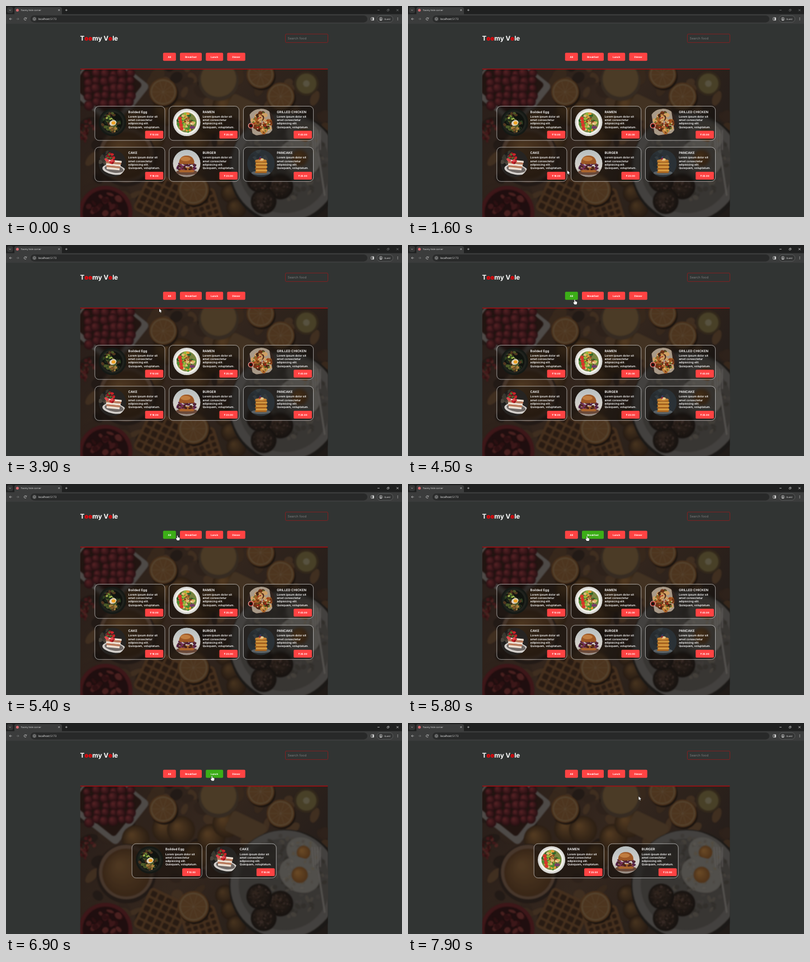
Animation, 708 px wide and 378 px high, one loop 8 s. Source, as an HTML page with a canvas:

```html
<!DOCTYPE html>
<html lang="en">
<head>
<meta charset="utf-8">
<title>Toomy Vole corner</title>
<style>
html, body { margin: 0; width: 100%; height: 100%; overflow: hidden; background: #313433; }
canvas { display: block; width: 708px; height: 378px; }
</style>
</head>
<body>
<canvas id="stage"></canvas>
<script>
const W = 708, H = 378, LOOP = 8000, TAU = Math.PI * 2;
const DPR = window.devicePixelRatio || 1;
const UI = 'Inter, Roboto, sans-serif', CHROME = '"Open Sans", "Noto Sans", sans-serif';
const PAGE = '#313433', RED = '#ff4343', GREEN = '#3cae17', ICON = '#dedede';
const LEFT = 132.8, TOP = 113, WIDE = 442.6;
const CARD = { w: 125.2, h: 61.3, dx: 132.8, dy: 73.5, dish: 24.6 };
let g;

function setup(cv) {
  cv.width = Math.round(W * DPR);
  cv.height = Math.round(H * DPR);
  const c = cv.getContext('2d');
  c.scale(DPR, DPR);
  if ('textRendering' in c) c.textRendering = 'geometricPrecision';
  return c;
}

function layer(draw) {
  const cv = document.createElement('canvas'), old = g;
  g = setup(cv);
  draw();
  g = old;
  return cv;
}

let seed = 1;
const rnd = () => (seed = seed * 16807 % 2147483647) / 2147483647;
const repeat = (n, fn) => { for (let i = 0; i < n; i++) fn(i); };

function disc(x, y, r, fill, ry = r, rot = 0) {
  g.fillStyle = fill;
  g.beginPath();
  g.ellipse(x, y, r, ry, rot, 0, TAU);
  g.fill();
}

function ring(x, y, r, color, w = 0.6, from = 0, to = TAU) {
  g.strokeStyle = color;
  g.lineWidth = w;
  g.beginPath();
  g.arc(x, y, r, from, to);
  g.stroke();
}

function box(x, y, w, h, r, fill, stroke, lw = 0.7) {
  g.beginPath();
  g.roundRect(x, y, w, h, r);
  if (fill) { g.fillStyle = fill; g.fill(); }
  if (stroke) { g.strokeStyle = stroke; g.lineWidth = lw; g.stroke(); }
}

function tilted(x, y, rot, draw) {
  g.save();
  g.translate(x, y);
  g.rotate(rot);
  draw();
  g.restore();
}

function line(x, y, x2, y2, color = ICON, w = 0.65) {
  g.strokeStyle = color;
  g.lineWidth = w;
  g.beginPath();
  g.moveTo(x, y);
  g.lineTo(x2, y2);
  g.stroke();
}

function cross(x, y, r, color, rot = Math.PI / 4) {
  tilted(x, y, rot, () => { line(-r, 0, r, 0, color); line(0, -r, 0, r, color); });
}

function chevron(x, y, r, rot, color) {
  tilted(x, y, rot, () => { line(-r, -r, 0, 0, color); line(0, 0, r, -r, color); });
}

function text(s, x, y, size, color = '#fff', weight = 400, font = UI, align = 'left') {
  g.font = `${weight} ${size}px ${font}`;
  g.fillStyle = color;
  g.textAlign = align;
  g.fillText(s, x, y);
  return g.measureText(s).width;
}

// seeded blobs spread over a circle
function scatter(n, x, y, r, size, colors) {
  repeat(n, i => {
    const a = rnd() * TAU, d = Math.sqrt(rnd()) * r;
    disc(x + d * Math.cos(a), y + d * Math.sin(a), size * (0.6 + rnd() * 0.7),
      colors[i % colors.length], size * (0.4 + rnd() * 0.5), rnd() * 3);
  });
}

function ball(x, y, r, light, dark) {
  const gr = g.createRadialGradient(x - r * 0.3, y - r * 0.3, r * 0.1, x, y, r);
  gr.addColorStop(0, light);
  gr.addColorStop(1, dark);
  disc(x, y, r, gr);
}

function slice(x, y, r) {
  disc(x + 2, y + 3, r, '#1b120c');
  disc(x, y, r, '#56371c');
  disc(x, y, r * 0.9, '#655036');
  disc(x, y, r * 0.8, '#5a3c20');
  repeat(5, i => tilted(x, y, i * Math.PI / 5, () => line(-r * 0.8, 0, r * 0.8, 0, '#685139', 0.8)));
}

function waffle(x, y, size, rot) {
  tilted(x, y, rot, () => {
    box(-size / 2, -size / 2, size, size, 8, '#50351f');
    const step = (size - 6) / 5;
    repeat(25, i => box(-size / 2 + 5 + i % 5 * step, -size / 2 + 5 + Math.floor(i / 5) * step,
      step - 4, step - 4, 2, '#2c1c11'));
  });
}

function fryEgg(x, y, r) {
  disc(x, y, r, '#5f5c57', r * 0.8, 0.5);
  scatter(30, x, y, r * 0.8, 3, ['#67635c', '#57524b', '#625a4b']);
  ball(x, y, r * 0.38, '#7d5528', '#5b3819');
}

const photo = layer(() => {
  g.beginPath();
  g.rect(LEFT, TOP, WIDE, H - TOP);
  g.clip();
  const wood = g.createLinearGradient(LEFT, TOP, LEFT + WIDE, H);
  wood.addColorStop(0, '#2c1f19');
  wood.addColorStop(0.45, '#3b2a1f');
  wood.addColorStop(1, '#211b18');
  g.fillStyle = wood;
  g.fillRect(LEFT, TOP, WIDE, H);
  g.filter = `blur(${0.9 * DPR}px)`;
  seed = 11;
  scatter(150, 350, 240, 230, 13, ['#4a3422', '#33241b', '#241a15', '#3f2c1d']);

  tilted(184, 146, -0.9, () => box(-50, -58, 98, 114, 8, '#5b5653'));
  tilted(182, 142, -0.9, () => box(-42, -50, 82, 98, 6, '#24140f'));
  repeat(30, i => ball(144 + i % 6 * 15 + rnd() * 5, 119 + Math.floor(i / 6) * 13 + rnd() * 4 + (i % 6 ? 0 : 3),
    7 + rnd() * 3, '#622226', '#2a0d10'));
  scatter(30, 138, 220, 20, 4, ['#4b181a', '#35100f', '#5a2623']);

  repeat(7, i => ball(232 + i * 27, 208 + 30 * Math.sin(i * 1.9), 25, '#5f4122', '#302012'));
  disc(380, 134, 36, '#3d3024');
  disc(380, 131, 32, '#574329');
  tilted(428, 190, 0.45, () => box(-34, -22, 68, 40, 6, '#4c3824'));
  for (const [x, y] of [[281, 154], [491, 162], [455, 123]]) slice(x, y, 25);
  disc(537, 139, 22, '#392c1c');
  disc(537, 139, 18, '#544a2b');
  disc(537, 139, 6, '#67604a');

  disc(215, 270, 53, '#241a15');
  disc(215, 267, 49, '#543f31');
  ball(215, 268, 43, '#5b3f23', '#402916');
  disc(178, 370, 48, '#471619');
  disc(178, 370, 41, '#210b0c');
  scatter(40, 178, 370, 36, 6, ['#451719', '#310e10', '#552221']);

  waffle(278, 345, 78, 0.45);
  waffle(350, 364, 64, -0.3);
  slice(335, 329, 28);
  repeat(3, i => ball(392 + i * 10, 308 + i * 27, 18, '#50381f', '#291b11'));

  disc(500, 292, 101, '#1c1916');
  disc(498, 289, 97, '#4e4b48');
  disc(498, 289, 82, '#403d3a');
  scatter(120, 500, 275, 74, 5, ['#46423e', '#383530', '#4d4841']);
  fryEgg(532, 232, 32);
  fryEgg(525, 272, 38);
  repeat(3, i => {
    const a = -0.2 + i * TAU / 3, x = 468 + 23 * Math.cos(a), y = 328 + 23 * Math.sin(a);
    ball(x, y, 23, '#37281f', '#15100d');
    scatter(50, x, y, 18, 2.2, ['#40302a', '#1f1712', '#2f231d']);
  });
  repeat(4, i => line(547 + i * 5, 222, 550 + i * 4, 258, '#6f6c69', 1.7));
  line(557, 256, 570, 340, '#65625e', 3);
  g.filter = 'none';
  g.fillStyle = 'rgba(28,28,27,.2)';
  g.fillRect(LEFT, TOP, WIDE, H);
});

// each dish is drawn around 0,0 and clipped to a circle
const plate = (...colors) => colors.forEach((c, i) => disc(0, 0, 25 - i * 3.5, c));

const dishes = {
  egg() {
    plate('#151915', '#20231e', '#10130f');
    scatter(60, -2, 0, 17, 3, ['#2e4120', '#4d5a28', '#513720', '#192419']);
    scatter(14, 2, 10, 7, 2.4, ['#a9803e', '#7c5727']);
    disc(1, 1, 6.5, '#ddd2bd', 5, -0.4);
    disc(2, 1, 3.5, '#f0a325', 3);
    scatter(7, -6, -8, 5, 2, ['#6b9132', '#a3b952']);
  },
  ramen() {
    plate('#d8d8d5', '#f2f0e9', '#798441');
    scatter(60, 0, 0, 16, 3.3, ['#4b8d31', '#96b93b', '#e49b36', '#dfbf78', '#2e6628']);
    repeat(4, i => disc(-12 + i, -7 + i * 6, 3.2, '#d8362a'));
    scatter(40, 4, -2, 8, 1.8, ['#a85e27', '#f0d29b', '#6d391d', '#dfab61']);
    disc(10, 9, 5, '#743c66', 3);
  },
  chicken() {
    plate('#30241f');
    tilted(-1, 0, -0.15, () => box(-17, -24, 36, 46, 3, '#a99a88'));
    scatter(45, 2, 0, 17, 5, ['#a65d24', '#713417', '#c78a40', '#4c2615', '#d0a064']);
    scatter(30, 2, 0, 18, 1.8, ['#60742c', '#e8c78d', '#a6261a']);
    disc(-18, 6, 5, '#ece0d4');
    disc(-18, 6, 4, '#1c1210');
    ring(-18, 6, 3.6, '#c62620', 1.2);
  },
  cake() {
    plate('#262422');
    scatter(25, -12, -8, 14, 5, ['#39382f', '#1d1d1b', '#4a443b']);
    disc(3, 11, 21, '#d4d0cc', 9, 0.15);
    disc(3, 10, 17, '#6f6966', 6.5, 0.15);
    tilted(1, 3, 0.1, () => repeat(5, i =>
      box(-14 + i * 0.8, -9 + i * 3.4, 29 - i * 1.4, 3.6, 1, i % 2 ? '#b9795a' : '#eee0d2')));
    scatter(16, -3, -9, 9, 3, ['#c9232a', '#91151e', '#e0474b']);
    scatter(6, -5, -13, 6, 1.7, ['#4d7b34']);
  },
  burger() {
    const wall = g.createLinearGradient(0, -25, 0, 25);
    wall.addColorStop(0, '#b6bec0');
    wall.addColorStop(0.65, '#d6d2cc');
    wall.addColorStop(1, '#8f8178');
    plate(wall);
    disc(0, 16, 19, '#69493a', 5);
    box(-14, 7, 28, 9, 4, '#a9642d');
    repeat(50, i => disc(-16 + rnd() * 32, rnd() * 11, 2.5, ['#512044', '#472018', '#76305a', '#4f2a20'][i % 4], 1.5));
    box(-13.5, -14, 27, 15, [13, 13, 3, 3], '#9d5826');
    disc(-2, -8, 9, '#c07d40', 4);
  },
  pancake() {
    plate('#2a3136');
    scatter(20, -6, -8, 16, 6, ['#343b3e', '#262c30']);
    disc(0, 17, 17, '#596166', 4);
    repeat(7, i => box(-10.5 + i % 2, 14 - i * 3.1, 21, 3.3, 1.7, i % 2 ? '#d79a3f' : '#a8641f'));
    disc(0, -5, 10.5, '#c98534', 2.6);
    disc(1, -7, 4, '#e8c487', 2.3);
    scatter(5, 0, -9, 3, 2, ['#303b61', '#8e2530']);
  }
};

const foods = [
  ['Boilded Egg', 10, 'egg'], ['RAMEN', 25, 'ramen'], ['GRILLED CHICKEN', 45, 'chicken'],
  ['CAKE', 18, 'cake'], ['BURGER', 23, 'burger'], ['PANCAKE', 25, 'pancake']
];
const blurb = ['Lorem ipsum dolor sit', 'amet consectetur', 'adipisicing elit.', 'Quisquam, voluptatum.'];

function card([name, price, dish], x, y) {
  g.save();
  box(x, y, CARD.w, CARD.h, 7.4);
  g.clip();
  g.filter = `blur(${2.5 * DPR}px)`;
  g.drawImage(photo, 0, 0, W, H);
  g.filter = 'none';
  g.fillStyle = 'rgba(14,10,8,.42)';
  g.fillRect(x, y, CARD.w, CARD.h);
  g.restore();
  box(x, y, CARD.w, CARD.h, 7.4, null, 'rgba(255,255,255,.8)');

  tilted(x + 31.4, y + 29, 0, () => {
    g.beginPath();
    g.arc(0, 0, CARD.dish, 0, TAU);
    g.clip();
    seed = 29;
    dishes[dish]();
  });

  text(name, x + 59.8, y + 12, 5.9, '#fff', 600);
  blurb.forEach((s, i) => text(s, x + 59.8, y + 20.4 + i * 6.26, 5.06, '#fff', 600));
  box(x + 89.9, y + 43.9, 32.6, 14.2, 1.85, RED);
  text(`₹ ${price}.00`, x + 106.2, y + 52.6, 4.3, '#fff', 700, UI, 'center');
}

function browser() {
  g.fillStyle = '#1f2020';
  g.fillRect(0, 0, W, 15);
  g.fillStyle = '#3b3c3c';
  g.fillRect(0, 14.6, W, 17.2);
  box(2, 2, 10.6, 10.6, 3.4, '#353636');
  chevron(7.3, 8.2, 1.5, 0, ICON);
  box(15, 2, 85, 16, [3.6, 3.6, 0, 0], '#3b3c3c');
  disc(20.4, 7.4, 2.5, '#d9696f');
  text('Toomy Vole corner', 26.4, 9, 4.2, '#e3e3e3', 400, CHROME);
  cross(94.8, 7.4, 2, ICON);
  cross(107.9, 7.4, 1.9, ICON, 0);

  const mid = 23.2;
  line(6.2, mid, 10.5, mid);
  chevron(6.2, mid, 2, Math.PI / 2, ICON);
  line(18.8, mid, 23, mid, '#818282');
  chevron(23, mid, 2, -Math.PI / 2, '#818282');
  ring(34.4, mid, 2.1, ICON, 0.75, 0.5, 5.5);
  chevron(36.4, mid - 0.7, 1.3, -0.4, ICON);

  box(44, 17, 602, 12.4, 6.2, '#282929');
  disc(50.8, mid, 4.4, '#3b3c3c');
  ring(50.8, mid, 2.2, ICON);
  line(50.8, mid - 0.3, 50.8, mid + 1.2);
  const w = text('localhost', 57.4, 24.9, 4.9, '#fff', 400, CHROME);
  text(':5173', 57.4 + w, 24.9, 4.9, '#d7d7d7', 400, CHROME);

  box(652.8, 20.8, 4.8, 4.8, 0.6, null, ICON);
  box(655.4, 20.8, 2.2, 4.8, 0, ICON);
  box(663.3, 17.2, 28.6, 12, 6, '#333434', '#797b7b', 0.5);
  ring(670.2, mid, 2.8, ICON);
  disc(670.2, mid - 0.8, 0.95, ICON);
  disc(670.2, mid + 1.7, 1.7, ICON, 0.8);
  text('Guest', 676.2, 24.8, 4.15, '#e3e3e3', 400, CHROME);
  repeat(3, i => disc(700.3, mid + (i - 1) * 1.8, 0.55, ICON));
}

function title() {
  let x = 132.4;
  for (const part of ['T', 'oo', 'my V', 'o', 'le']) {
    const hot = part[0] === 'o';
    if (hot) repeat(part.length, i => disc(x + 3.6 + i * 7.2, 58, 2.2, '#a30d11'));
    x += text(part, x, 61.6, 11.6, hot ? '#ee080c' : '#fff', 700);
  }
}

function scene(pick) {
  return layer(() => {
    g.fillStyle = PAGE;
    g.fillRect(0, 0, W, H);
    browser();
    title();
    box(499.5, 50.2, 76, 15.2, 1.9, null, '#a5171a');
    text('Search food', 503.4, 59.8, 5.85, '#7b7c7c');
    g.drawImage(photo, 0, 0, W, H);
    box(LEFT, 112.2, WIDE, 1.5, 0, '#a90d12');
    const cols = Math.min(3, pick.length), rows = pick.length / cols;
    const x0 = 354.2 - (cols - 1) / 2 * CARD.dx - CARD.w / 2;
    const y0 = 246.9 - (rows - 1) / 2 * CARD.dy - CARD.h / 2;
    pick.forEach((k, i) => card(foods[k], x0 + i % cols * CARD.dx, y0 + Math.floor(i / cols) * CARD.dy));
  });
}

const scenes = [scene([0, 1, 2, 3, 4, 5]), scene([0, 3]), scene([1, 4])];
const filters = [['All', 280.8, 23], ['Breakfast', 311, 39], ['Lunch', 357.2, 31], ['Dinner', 395.4, 32.4]];

// pointer moves: start, end, x, y reached
const moves = [
  [1400, 1400, 313, 303], [1400, 2200, 135, 250], [2500, 2900, 158, 196.5], [3200, 3900, 274, 114],
  [3900, 4800, 306.4, 92.2], [5400, 5800, 320, 93.4], [6300, 6900, 368.3, 94.8], [7300, 7900, 412.4, 131.4]
];

function pointer(t) {
  let p = null;
  for (const [from, to, x, y] of moves) {
    if (t < from) break;
    const u = Math.min(1, (t - from) / (to - from || 1)), e = u * u * (3 - 2 * u);
    p = p ? [p[0] + (x - p[0]) * e, p[1] + (y - p[1]) * e] : [x, y];
  }
  return p;
}

const arrow = new Path2D('M0 0V6.4L1.5 5.1 2.5 7.4 3.6 6.9 2.6 4.7H4.6Z');
const hand = new Path2D('M-.7 .7Q0-.6 .7 .7V3.3Q2.7 3 4.2 4.5V6.4L3.4 8.7H-.5L-2.4 5.7Q-2.7 4.5-1.7 4.6L-.7 5.3Z');

function drawPointer([x, y], shape) {
  tilted(x, y, 0, () => {
    g.lineJoin = 'round';
    g.lineWidth = 0.8;
    g.strokeStyle = '#111';
    g.fillStyle = '#fff';
    g.stroke(shape);
    g.fill(shape);
  });
}

function windowButtons(color) {
  line(664.2, 7.5, 667.8, 7.5, color);
  box(682.4, 5.7, 2.6, 2.6, 0.4, null, color, 0.5);
  box(681.3, 6.6, 2.6, 2.6, 0.4, '#1f2020', color, 0.5);
  cross(700, 7.5, 2.5, color);
}

const stage = setup(document.getElementById('stage'));

function frame(now) {
  const t = now % LOOP;
  g = stage;
  g.drawImage(scenes[t < 6000 ? 0 : t < 7300 ? 1 : 2], 0, 0, W, H);
  windowButtons(t < 4300 ? '#888989' : '#f4f4f4');
  const p = pointer(t);
  let shape = arrow;
  for (const [name, x, w] of filters) {
    const over = p && p[0] > x - 3.3 && p[0] < x + w + 3.3 && p[1] > 84 && p[1] < 98.3;
    if (over) shape = hand;
    box(x, 83.8, w, 14.4, 1.85, over ? GREEN : RED);
    text(name, x + w / 2, 92.6, 4.4, '#fff', 700, UI, 'center');
  }
  if (p) drawPointer(p, shape);
  requestAnimationFrame(frame);
}
requestAnimationFrame(frame);
</script>
</body>
</html>
```
